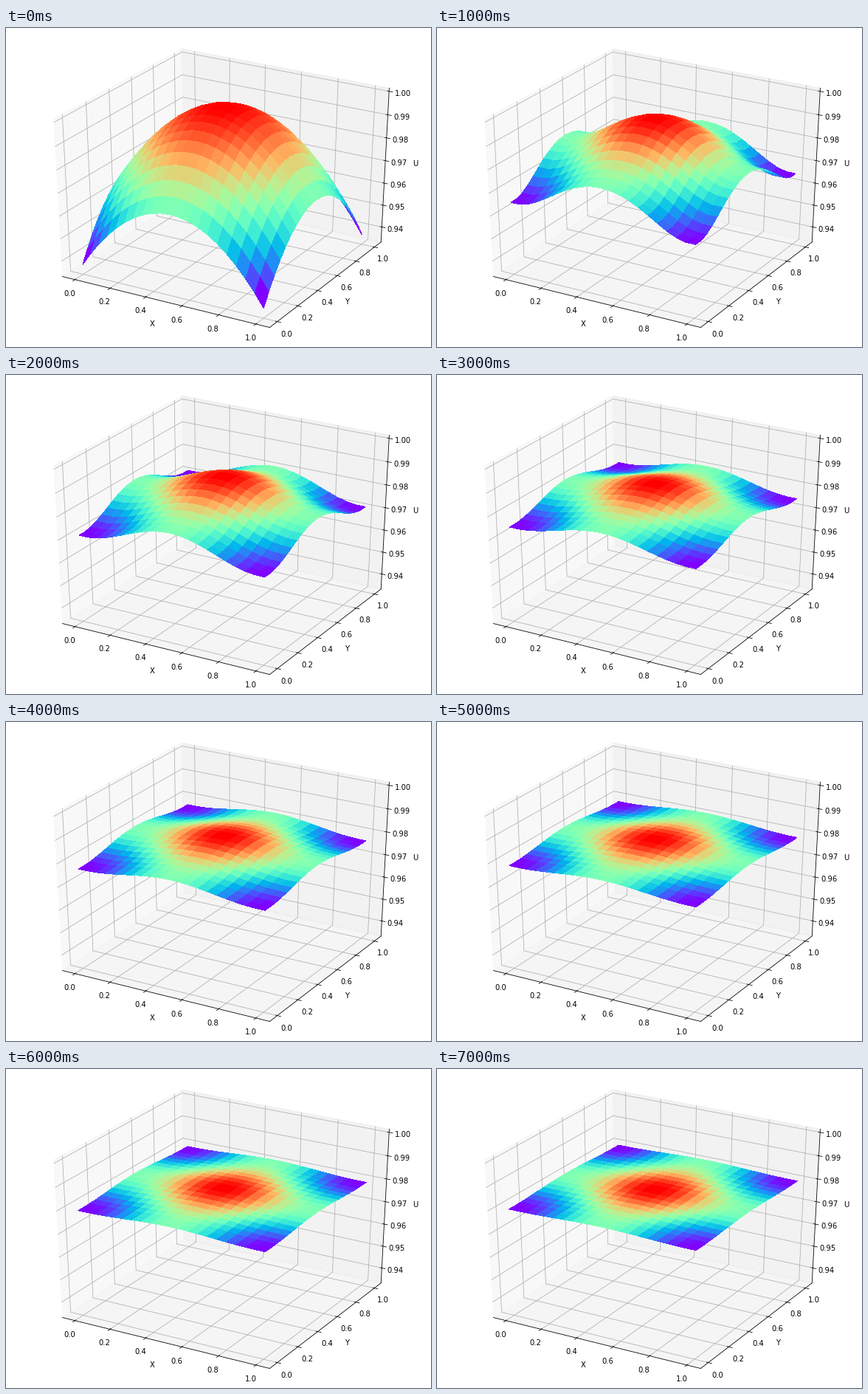
Write a matplotlib script that moves like this. It is 576 px wide and 432 px high and loops after 8000 ms.

```python
import matplotlib.pyplot as plt
import numpy as np
from matplotlib.animation import FuncAnimation
from mpl_toolkits.mplot3d import Axes3D

POINTS = 21          # grid points per side
DT = 0.0005          # time step of the heat equation
STEPS = 20           # time steps per frame
FRAMES = 8
INTERVAL = 1000      # ms per frame


class WideAxes(Axes3D):
    """3D axes that stretch over their whole rectangle."""

    def apply_aspect(self, position=None):
        pass


def step(u, h):
    """One explicit diffusion step with insulated edges."""
    new = u.copy()
    lap = (u[2:, 1:-1] + u[:-2, 1:-1] + u[1:-1, 2:] + u[1:-1, :-2]
           - 4 * u[1:-1, 1:-1])
    new[1:-1, 1:-1] += DT / h ** 2 * lap
    new[0], new[-1] = new[1], new[-2]
    new[:, 0], new[:, -1] = new[:, 1], new[:, -2]
    return new


def solve(u, h):
    states = [u]
    for _ in range(FRAMES - 1):
        for _ in range(STEPS):
            u = step(u, h)
        states.append(u)
    return states


def padded(low, high):
    pad = (high - low) / 48
    return low - pad, high + pad


grid = np.linspace(0, 1, POINTS)
X, Y = np.meshgrid(grid, grid)
start = 1 - ((X - 0.5) ** 2 + (Y - 0.5) ** 2) / 8
states = solve(start, grid[1] - grid[0])

fig = plt.figure(figsize=(8, 6), dpi=72, facecolor="white")
ax = WideAxes(fig, (0, 0, 1, 1))
fig.add_axes(ax)
ax.view_init(elev=30, azim=-60)
# cancel the default zoom so that the box is a unit cube plus padding
ax.set_box_aspect((1, 1, 1), zoom=3 ** 0.5 / 1.8294640721620434)

ax.set_xticks(np.arange(6) / 5)
ax.set_yticks(np.arange(6) / 5)
ax.set_zticks(np.arange(94, 101) / 100)
ax.set_xlim(*padded(-0.05, 1.05))
ax.set_ylim(*padded(-0.05, 1.05))
ax.set_zlim(*padded(0.934375, 1.0))
ax.set_xlabel("X")
ax.set_ylabel("Y")
ax.set_zlabel("U")


def update(i):
    for surface in list(ax.collections):
        surface.remove()
    surface = ax.plot_surface(X, Y, states[i], cmap="rainbow",
                              linewidth=0, antialiased=False)
    return [surface]


anim = FuncAnimation(fig, update, frames=FRAMES, interval=INTERVAL,
                     repeat=True, repeat_delay=0, blit=False)
plt.show()
```
